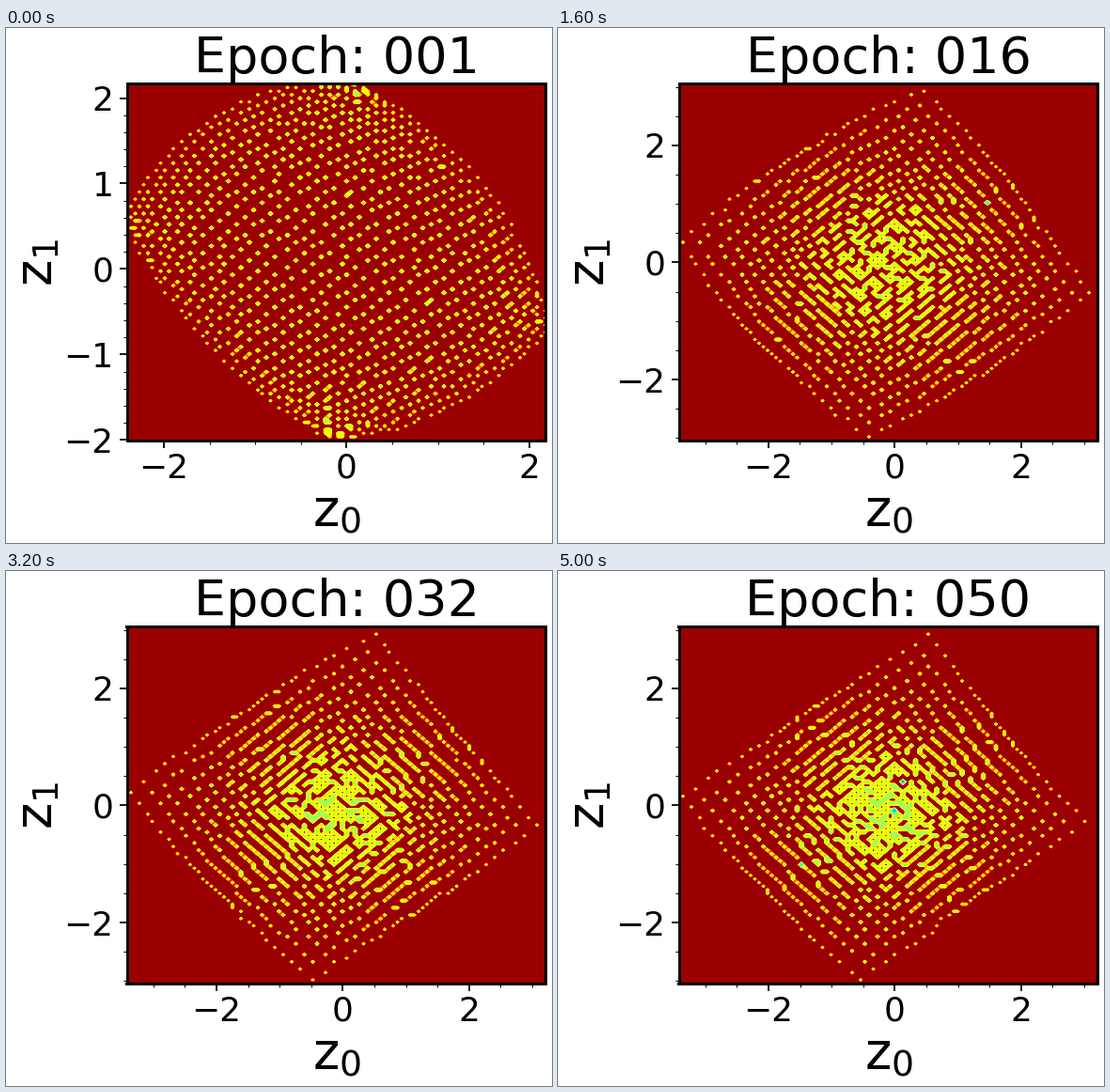
Write a matplotlib script that moves like this. It is 581 px wide and 548 px high and loops after 5100 ms.

```python
import numpy as np
import matplotlib.pyplot as plt
from matplotlib.animation import FuncAnimation
from matplotlib.ticker import AutoMinorLocator, MultipleLocator

WIDTH, HEIGHT, DPI = 581, 548, 100
FRAMES, INTERVAL = 51, 100
SIDE, BINS = 32, 100
PX = 72 / DPI  # points per pixel

plt.rcParams["font.family"] = "DejaVu Sans"

# Axis limits: left, right, bottom, top.
FIRST_LIMITS = np.array([-2.406, 2.175, -2.005, 2.165])
LAST_LIMITS = np.array([-3.42, 3.21, -3.04, 3.05])

# Outline of the sheet in axes fractions: corners left, top, right, bottom,
# then the bulge of the edges upper left, upper right, lower right, lower left.
FIRST_SHAPE = np.array([(.007, .61), (.546, .995), (.995, .32), (.49, .005),
                        (-.056, .11), (.067, .063), (.027, -.063), (-.04, -.045)])
LAST_SHAPE = np.array([(.012, .53), (.597, .98), (.97, .453), (.436, .018),
                       (0, 0), (-.012, -.012), (0, 0), (-.01, -.015)])

LEVELS = [.37, .41, .45, .49, .8, 1.1, 1.4, 1.8, 2.6, 50]
COLORS = plt.cm.jet_r(np.linspace(.1, .8, len(LEVELS) - 1))

axis = np.linspace(-1, 1, SIDE)
U, V = (grid.ravel() for grid in np.meshgrid(axis, axis))
RIM = np.maximum(abs(U), abs(V))
WEIGHT = 1 - .35 * RIM ** 5


def mix(start, end, amount):
    return start + (end - start) * amount


def wobble(epoch):
    """Smooth random distortion of the sheet, different at each epoch."""
    rng = np.random.default_rng(epoch)
    shift = rng.normal(0, .0014, (2, U.size))
    for axis_shift in shift:
        for a, b, phase in rng.normal(0, 2.5, (3, 3)):
            axis_shift += .0022 * np.sin(a * U + b * V + phase)
    return shift


def sheet_points(epoch):
    progress = np.log(epoch) / np.log(FRAMES - 1)
    shape = mix(FIRST_SHAPE, LAST_SHAPE, progress)[..., None]
    left, top, right, bottom, up_left, up_right, low_right, low_left = shape
    crowd = mix(-.15, .42, np.sqrt(progress))
    u, v = ((1 - crowd) * t + crowd * t ** 3 for t in (U, V))
    u0, u1, v0, v1 = (1 - u) / 2, (1 + u) / 2, (1 - v) / 2, (1 + v) / 2
    points = v0 * (u0 * left + u1 * top) + v1 * (u0 * bottom + u1 * right)
    points += (1 - u ** 2) * (v0 * up_left + v1 * low_right)
    points += (1 - v ** 2) * (u1 * up_right + u0 * low_left)
    return np.clip(points + wobble(epoch), .004, .996)


def density(epoch):
    x, y = sheet_points(epoch)
    counts, _, _ = np.histogram2d(y, x, bins=BINS, range=[[0, 1], [0, 1]],
                                  weights=WEIGHT)
    return counts


fig = plt.figure(figsize=(WIDTH / DPI, HEIGHT / DPI), dpi=DPI, facecolor="white")
ax = fig.add_axes([128.5 / WIDTH, 1 - 438.8 / HEIGHT, 445.5 / WIDTH, 379.3 / HEIGHT])
ax.set_facecolor("#9a0000")
for spine in ax.spines.values():
    spine.set_linewidth(3 * PX)
    spine.set_zorder(5)
ax.tick_params(which="major", length=8 * PX, width=1.8 * PX, pad=6 * PX,
               labelsize=36 * PX)
ax.tick_params(axis="x", pad=5 * PX)
ax.tick_params(which="minor", length=4 * PX, width=1 * PX)


def label(x, y, text, **options):
    return fig.text(x / WIDTH, 1 - y / HEIGHT, text, fontsize=54 * PX,
                    ha="center", va="baseline", **options)


title = label(351.5, 48, "")
label(352, 530, r"$\mathregular{z_0}$")
label(48, 249, r"$\mathregular{z_1}$", rotation=90, rotation_mode="anchor")

contours = []


def draw(frame):
    epoch = max(1, frame)
    while contours:
        contours.pop().remove()
    growth = 1 - np.exp(-.45 * (epoch - 1))
    x0, x1, y0, y1 = mix(FIRST_LIMITS, LAST_LIMITS, growth)
    contours.append(ax.contourf(np.linspace(x0, x1, BINS), np.linspace(y0, y1, BINS),
                                density(epoch), levels=LEVELS, colors=COLORS))
    ax.set(xlim=(x0, x1), ylim=(y0, y1))
    ax.xaxis.set_major_locator(MultipleLocator(2))
    ax.yaxis.set_major_locator(MultipleLocator(1 if y1 - y0 < 4.6 else 2))
    ax.xaxis.set_minor_locator(AutoMinorLocator())
    ax.yaxis.set_minor_locator(AutoMinorLocator())
    title.set_text(f"Epoch: {epoch:03d}")
    return [title]


animation = FuncAnimation(fig, draw, frames=FRAMES, interval=INTERVAL,
                          init_func=lambda: [], repeat=True, blit=False)
plt.show()
```
